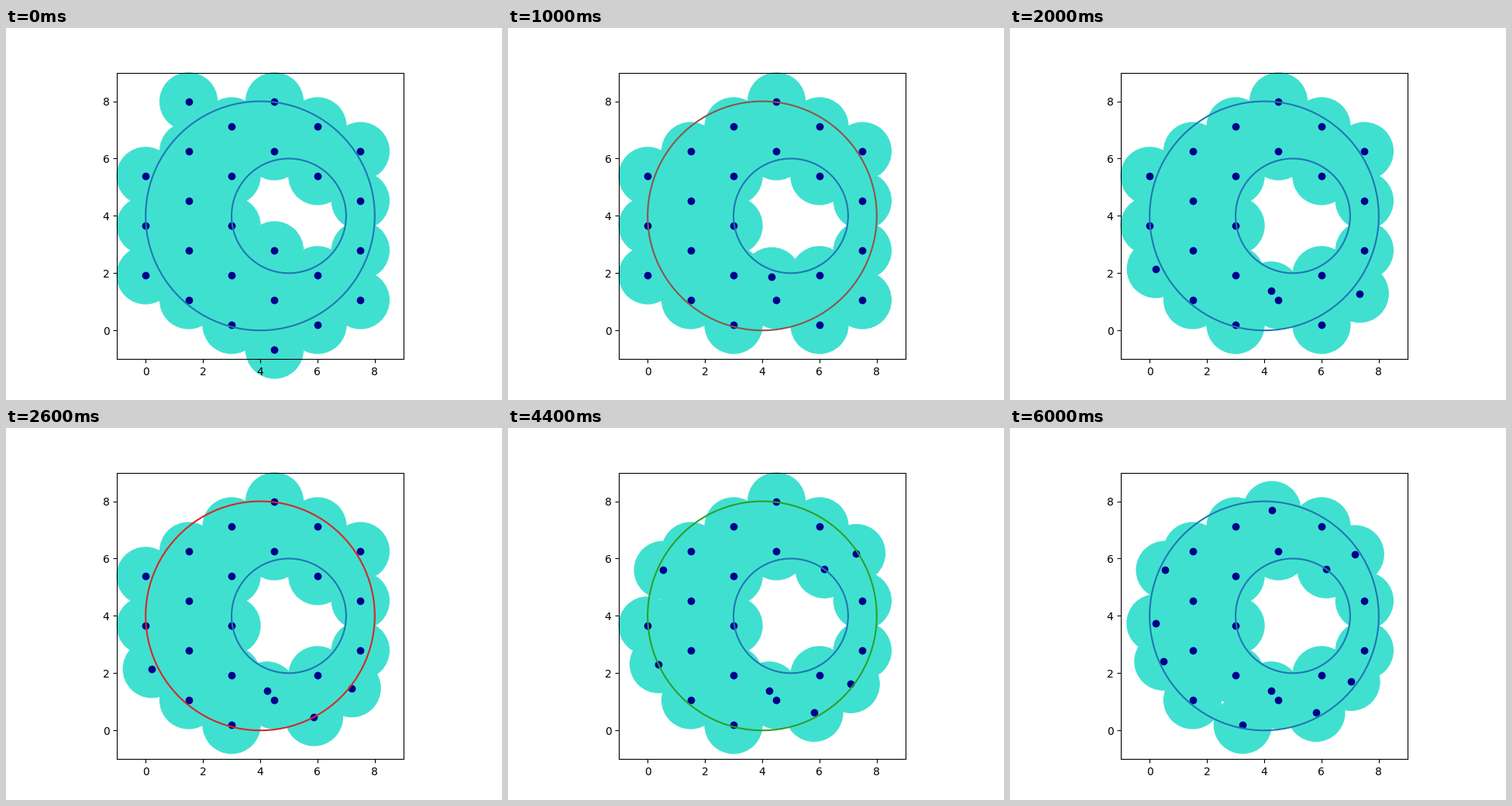
Write a matplotlib script that moves like this. It is 640 by 480 pixels and loops after 6.2 s.

```python
import numpy as np
import matplotlib.pyplot as plt
from matplotlib.animation import FuncAnimation
from matplotlib.patches import Circle

FRAMES = 31
STEP_MS = 200
OUTER = (4, 4, 4)
HOLE = (5, 4, 2)
HOP_EVERY = 7       # steps between two hops of the same disc
DROP_BEYOND = 4.6   # discs this far from the middle are not needed


def lattice():
    """Triangular lattice over the ring, without sites deep in the hole."""
    for col in range(6):
        for row in range(6):
            x = 1.5 * col
            y = -5 + np.sqrt(3) * (3 + row - 0.5 * (col % 2))
            from_middle = np.hypot(x - OUTER[0], y - OUTER[1])
            from_hole = np.hypot(x - HOLE[0], y - HOLE[1])
            if from_middle < 4.75 and from_hole > 1.25:
                yield (col, row), np.array([x, y])


START = dict(lattice())
DROPPED = [
    site for site, (x, y) in sorted(START.items())
    if np.hypot(x - OUTER[0], y - OUTER[1]) > DROP_BEYOND
]

# Loose discs in the order they set off: resting place and number of hops.
REST = {
    (3, 2): (4.24, 1.39, 2),
    (5, 1): (7.03, 1.70, 4),
    (0, 1): (0.48, 2.41, 3),
    (4, 0): (5.81, 0.62, 2),
    (0, 3): (0.54, 5.60, 2),
    (5, 4): (7.17, 6.15, 2),
    (4, 3): (6.17, 5.63, 1),
    (3, 5): (4.27, 7.69, 1),
    (0, 2): (0.21, 3.74, 1),
    (2, 0): (3.25, 0.20, 1),
}
SET_OFF = np.linspace(3, 28, len(REST))


def layout(step):
    """Positions of the discs that remain at the given step."""
    sites = dict(START)
    for site in DROPPED[:step]:
        del sites[site]
    for (site, (x, y, hops)), first in zip(REST.items(), SET_OFF):
        done = np.clip((step - first) // HOP_EVERY + 1, 0, hops)
        share = 1 - (1 - done / hops) ** 1.5
        sites[site] = START[site] + share * (np.array([x, y]) - START[site])
    return sites


def ring(cx, cy, r):
    t = np.linspace(0, 2 * np.pi, 100)
    return ax.plot(cx + r * np.cos(t), cy + r * np.sin(t), color="C0")[0]


fig, ax = plt.subplots(figsize=(6.4, 4.8), dpi=100)
ax.set_aspect("equal")
ax.set_xlim(-1, 9)
ax.set_ylim(-1, 9)
ax.set_xticks(range(0, 9, 2))
ax.set_yticks(range(0, 9, 2))

discs = {
    site: ax.add_patch(Circle(pos, 1, color="turquoise", clip_on=False))
    for site, pos in START.items()
}
dots = ax.scatter(*zip(*START.values()), color="darkblue")
outer = ring(*OUTER)
ring(*HOLE)


def update(step):
    sites = layout(step)
    for site, disc in discs.items():
        disc.set_visible(site in sites)
        disc.center = sites.get(site, START[site])
    dots.set_offsets(list(sites.values()))
    outer.set_color(f"C{step % 10}")
    return [*discs.values(), dots, outer]


anim = FuncAnimation(fig, update, frames=FRAMES, interval=STEP_MS,
                     repeat=True, repeat_delay=0, blit=False)
plt.show()
```
